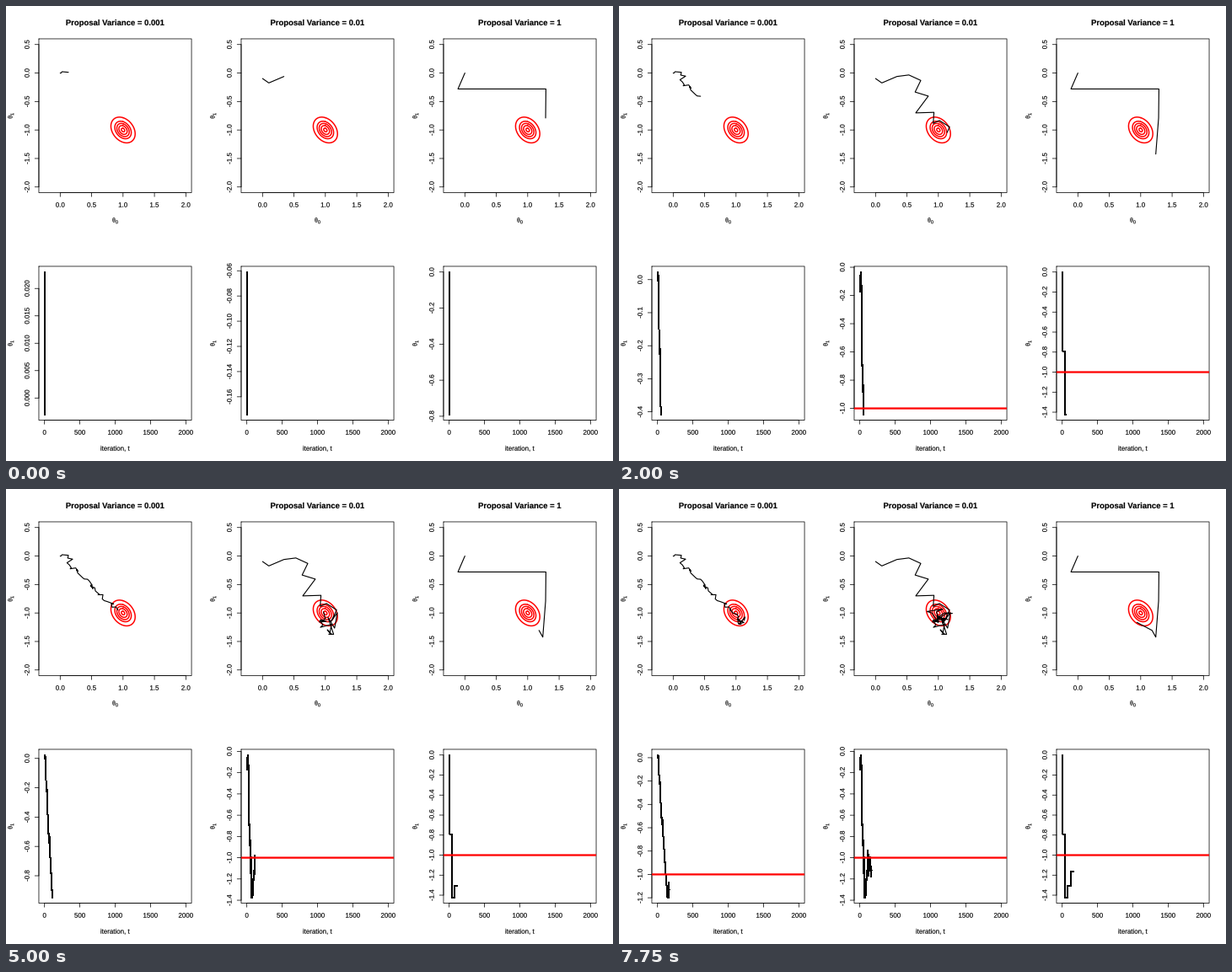
A matplotlib script for the animation above (8000 ms loop, 720x540 px).

```python
import math

import matplotlib.pyplot as plt
import numpy as np
from matplotlib.animation import FuncAnimation
from matplotlib.patches import PathPatch
from matplotlib.textpath import TextPath
from matplotlib.transforms import Affine2D

plt.rcParams.update({"path.snap": False, "path.simplify": False})

W, H = 720, 540
CELL_W, CELL_H = 240, 270
LINE = 9.504                      # height of one margin line
LEFT, TOP = 4.1 * LINE, 4.1 * LINE
PW = CELL_W - 6.2 * LINE
PH = CELL_H - 9.2 * LINE
FONT = 7.92
THIN, PATH, RING, RULE = 0.75, 1.125, 1.5, 2.25
RED = "#ff0000"
FRAMES, INTERVAL = 32, 250
LAST = 10 + 5 * (FRAMES - 1)
XLIM, YLIM, TLIM = (-0.34, 2.09), (-2.1, 0.6), (-80, 2080)

# Walks: variance, iterations per accepted move, spread, and turning
# points as (iteration, x, y).
WALKS = [
    ("0.001", 3, .03, [
        (1, 0, 0), (2, .01, -.003), (4, .03, .023), (9, .13, .0128),
        (25, .175, -.206), (50, .435, -.408), (75, .56, -.613),
        (110, .92, -.948), (130, 1.05, -1.128), (148, 1.08, -1.1975),
        (LAST, 1.13, -1.13)]),
    ("0.01", 3, .08, [
        (1, 0, -.097), (4, .10, -.174), (8, .34, -.061), (13, .53, -.034),
        (18, .72, -.13), (23, .63, -.334), (28, .84, -.405), (33, .64, -.70),
        (38, .93, -.69), (50, 1.14, -1.043), (75, 1.10, -1.374),
        (110, .97, -.98), (LAST, 1.07, -1.12)]),
    ("1", LAST, 0, [
        (1, 0, 0), (3, -.11, -.28), (5, 1.29, -.28), (7, 1.285, -.79),
        (42, 1.24, -1.423), (78, 1.18, -1.305), (122, .94, -1.165)]),
]


def chain(every, spread, keys, seed):
    """State at each iteration: noisy moves between turning points."""
    rng = np.random.default_rng(seed)
    moves = [keys[0]]
    top = max(y for _, _, y in keys)
    low = keys[0][2]
    for a, b in zip(keys, keys[1:]):
        low = min(low, b[2])
        count = max(1, (b[0] - a[0]) // every)
        for k in range(1, count):
            t, x, y = np.add(a, np.subtract(b, a) * k / count)
            dx, dy = rng.normal(0, spread, 2)
            moves.append((t, x + dx, np.clip(y + dy, low, top)))
        moves.append(b)
    moves = np.array(moves)
    held = np.searchsorted(moves[:, 0], np.arange(1, LAST + 1), "right") - 1
    return moves[held, 1:]


def pretty(lo, hi):
    """Round tick values inside lo..hi and their number of decimals."""
    cell = (hi - lo) / 5
    base = 10 ** math.floor(math.log10(cell))
    unit = base
    for mult, bias in ((2, .8), (5, 1.7), (10, .8)):
        if mult * base - cell >= bias * (cell - unit):
            break
        unit = mult * base
    first, last = math.ceil(lo / unit - 1e-7), math.floor(hi / unit + 1e-7)
    decimals = max(0, -math.floor(math.log10(unit) + 1e-9))
    return [k * unit for k in range(first, last + 1)], decimals


def scale(v, lim, origin, size):
    return origin + (np.asarray(v) - lim[0]) / (lim[1] - lim[0]) * size


class Panel:
    def __init__(self, col, row, xlim, ylim):
        self.x0, self.y0 = col * CELL_W + LEFT, row * CELL_H + TOP
        self.x1, self.y1 = self.x0 + PW, self.y0 + PH
        self.xlim, self.ylim = xlim, ylim

    def px(self, x):
        return scale(x, self.xlim, self.x0, PW)

    def py(self, y):
        return scale(y, self.ylim, self.y1, -PH)

    def box(self):
        line([self.x0, self.x1, self.x1, self.x0, self.x0],
             [self.y0, self.y0, self.y1, self.y1, self.y0], THIN)

    def x_axis(self):
        ticks, dec = pretty(*self.xlim)
        xs = self.px(ticks)
        line([xs[0], xs[-1]], [self.y1] * 2, THIN)
        for x, v in zip(xs, ticks):
            line([x, x], [self.y1, self.y1 + LINE / 2], THIN)
            label(x, self.y1 + 1.8 * LINE, f"{v:.{dec}f}")

    def y_axis(self):
        ticks, dec = pretty(*self.ylim)
        ys = self.py(ticks)
        made = [line([self.x0] * 2, [ys[0], ys[-1]], THIN)]
        last = H
        for y, v in zip(ys, ticks):
            made.append(line([self.x0 - LINE / 2, self.x0], [y, y], THIN))
            s = f"{round(v, dec) + 0.0:.{dec}f}"
            half = FONT * (.556 * (dec + 1) + .278 + .333 * (v < 0)) / 2
            if last - (y + half) >= .833 * FONT:
                made.append(label(self.x0 - 1.2 * LINE, y, s, upright=False))
                last = y - half
        return made

    def x_name(self):
        return (self.x0 + self.x1) / 2, self.y1 + 3.8 * LINE

    def y_name(self):
        return self.x0 - 3.2 * LINE, (self.y0 + self.y1) / 2


fig = plt.figure(figsize=(W / 72, H / 72), dpi=72, facecolor="white")
ax = fig.add_axes([0, 0, 1, 1])
ax.set_xlim(0, W)
ax.set_ylim(H, 0)
ax.axis("off")


def line(x, y, width, color="black", z=2, cap="round", smooth=True):
    return ax.plot(x, y, color=color, lw=width, zorder=z, solid_capstyle=cap,
                   solid_joinstyle="round", antialiased=smooth)[0]


def label(x, y, s, size=FONT, upright=True, family="Liberation Sans",
          weight="normal"):
    """Outlined text, centred on x with its baseline at y."""
    glyphs = TextPath((0, 0), s, size=size,
                      prop={"family": family, "weight": weight})
    ink = glyphs.get_extents()
    place = Affine2D().translate(-(ink.x0 + ink.x1) / 2, 0).scale(1, -1)
    if not upright:
        place.rotate_deg(-90)
    place.translate(x, y)
    return ax.add_patch(PathPatch(place.transform_path(glyphs), fc="black",
                                  ec="black", lw=.15, zorder=3))


def theta(x, y, sub, upright=True):
    for s, along, drop, size, family in (
            ("θ", -1.55, -1, FONT, "Liberation Serif"),
            (sub, 1.95, .6, 5.5, "Liberation Sans")):
        dx, dy = (along, drop) if upright else (drop, -along)
        label(x + dx, y + dy, s, size, upright, family)


def rings(panel):
    t = np.linspace(0, 2 * np.pi, 121)
    lag = math.acos(-.3)
    for r in (1, .68, .51, .34, .14):
        line(panel.px(1 + .193 * r * np.sin(t)),
             panel.py(-1 + .226 * r * np.sin(t + lag)), RING, RED, z=3)


columns = []
for col, (variance, every, spread, keys) in enumerate(WALKS):
    upper = Panel(col, 0, XLIM, YLIM)
    lower = Panel(col, 1, TLIM, (0, 1))
    for p in (upper, lower):
        p.box()
        p.x_axis()
        theta(*p.y_name(), "1", upright=False)
    upper.y_axis()
    rings(upper)
    theta(*upper.x_name(), "0")
    label(*lower.x_name(), "iteration, t")
    label(upper.x_name()[0], 22.9, f"Proposal Variance = {variance}",
          1.2 * FONT, weight="bold")
    walk = line([], [], PATH, z=4)
    trace = line([], [], 1, z=4, smooth=False)
    mean = line([lower.x0, lower.x1], [0, 0], RULE, RED, z=5, cap="butt")
    states = chain(every, spread, keys, seed=col + 4)
    columns.append((states, upper, lower, walk, trace, mean))

axis_parts = []


def draw(i):
    n = 10 + 5 * i
    while axis_parts:
        axis_parts.pop().remove()
    for states, upper, lower, walk, trace, mean in columns:
        x, y = states[:n].T
        walk.set_data(upper.px(x), upper.py(y))
        pad = .04 * (y.max() - y.min())
        lower.ylim = (y.min() - pad, y.max() + pad)
        trace.set_data(lower.px(np.arange(1, n + 1)), lower.py(y))
        mean.set_visible(lower.ylim[0] <= -1)
        mean.set_ydata([lower.py(-1)] * 2)
        axis_parts.extend(lower.y_axis())
    return []


anim = FuncAnimation(fig, draw, frames=FRAMES, interval=INTERVAL,
                     init_func=lambda: [], repeat=True, blit=False)
plt.show()
```
